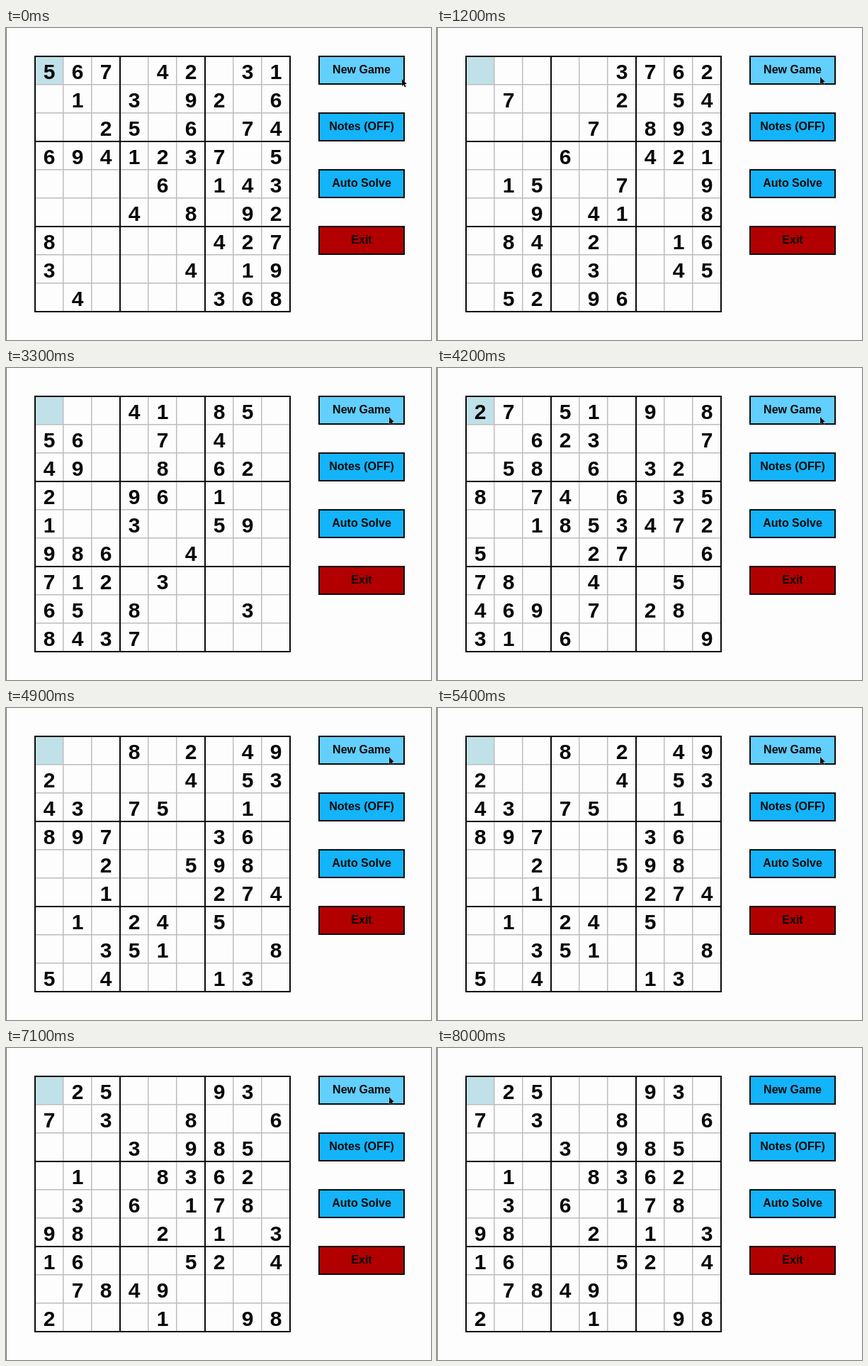
Recreate the animation shown at these times as an HTML page with a canvas. Size 600 by 440 pixels, loop 8200 ms.

```html
<!DOCTYPE html>
<html lang="en">
<head>
<meta charset="utf-8">
<title>Sudoku</title>
<style>
  html, body { margin: 0; width: 600px; height: 440px; overflow: hidden; }
  canvas { display: block; }
</style>
</head>
<body>
<canvas id="stage" width="600" height="440"></canvas>
<script>
const ctx = document.getElementById('stage').getContext('2d');
const LOOP = 8200, CELL = 40, LEFT = 40, TOP = 39;
const FONT = '"Liberation Sans", Arial, sans-serif';

// Nine rows per puzzle, a dot is an empty cell.
const puzzles = [
  '567.42.31 .1.3.92.6 ..25.6.74 6941237.5 ....6.143 ...4.8.92 8.....427 3....4.19 .4....368',
  '.....3762 .7...2.54 ....7.893 ...6..421 .15..7..9 ..9.41..8 .84.2..16 ..6.3..45 .52.96...',
  '.1...5973 ...81.562 ...796.14 4.....328 1.8934... 3..27.491 .4.1872.. 5..36..4. 731542.89',
  '27.51.9.8 ..623...7 .58.6.32. 8.74.6.35 ..1853472 5...27..6 78..4..5. 469.7.28. 31.6....9',
  '...8.2.49 2....4.53 43.75..1. 897...36. ..2..598. ..1...274 .1.24.5.. ..351...8 5.4...13.',
  '39.5....1 ....98.63 2.84..7.. 1.392.67. ....3.945 7.9..6..2 4.237.586 685.423.. ..76.52..',
  '.25...93. 7.3..8..6 ...3.985. .1..8362. .3.6.178. 98..2.1.3 16...52.4 .7849.... 2...1..98'
].map(rows => rows.replaceAll(' ', ''));

// Half a turn with complemented digits gives another valid puzzle.
const turned = p => [...p].reverse().map(c => c === '.' ? c : 10 - c).join('');

const schedule = [
  [0, puzzles[0]], [800, puzzles[1]], [1600, turned(puzzles[0])],
  [2400, puzzles[2]], [3100, turned(puzzles[1])], [4200, puzzles[3]],
  [4900, puzzles[4]], [5500, turned(puzzles[2])], [6100, puzzles[5]],
  [6700, puzzles[6]]
];

const LEAVE = 7700;
const ease = (t, from, to) => {
  const p = Math.min(1, Math.max(0, (t - from) / (to - from)));
  return p * p * (3 - 2 * p);
};

function rect(color, x, y, w, h) {
  ctx.fillStyle = color;
  ctx.fillRect(x, y, w, h);
}

function label(text, x, baseline, size) {
  ctx.font = `bold ${size}px ${FONT}`;
  ctx.textAlign = 'center';
  ctx.fillStyle = '#080808';
  ctx.fillText(text, x, baseline);
}

function drawBoard(puzzle) {
  rect('#c0e1e8', LEFT + 1, TOP + 1, CELL, CELL);
  const line = (i, color, width) => {
    rect(color, LEFT + i * CELL, TOP, width, 9 * CELL + 2);
    rect(color, LEFT, TOP + i * CELL, 9 * CELL + 2, width);
  };
  for (let i = 0; i < 10; i++) if (i % 3) line(i, '#bebcbe', 1.5);
  for (let i = 0; i < 10; i += 3) line(i, '#0a0a0a', 2);
  [...puzzle].forEach((digit, i) => {
    if (digit === '.') return;
    label(digit, 61 + i % 9 * CELL, 71.5 + Math.floor(i / 9) * CELL, 30);
  });
}

function drawButton(text, row, color) {
  const y = 39 + row * 80;
  rect('#0a0a0a', 441, y, 122, 41);
  rect(color, 443, y + 2, 118, 37);
  label(text, 502, y + 25, 16);
}

function drawCursor(x, y) {
  ctx.beginPath();
  [[0, 0], [0, 10], [2.3, 8], [4, 11.5], [5.6, 10.8], [4, 7.2], [7, 7]]
    .forEach(([dx, dy]) => ctx.lineTo(x + dx, y + dy));
  ctx.closePath();
  ctx.lineWidth = 1;
  ctx.strokeStyle = 'rgba(255, 255, 255, 0.5)';
  ctx.stroke();
  ctx.fillStyle = '#080808';
  ctx.fill();
}

function draw(t) {
  rect('#fefdfe', 0, 0, 600, 440);
  rect('#777', 0, 0, 1, 440);
  drawBoard(schedule.findLast(([start]) => t >= start)[1]);

  const hover = t < LEAVE;
  drawButton('New Game', 0, hover ? '#62cffc' : '#13b4f9');
  drawButton('Notes (OFF)', 1, '#13b4f9');
  drawButton('Auto Solve', 2, '#13b4f9');
  drawButton('Exit', 3, '#b20000');

  if (hover) {
    const settle = ease(t, 50, 800);
    drawCursor(559 - 18 * settle, 72 - 3 * settle - 26 * ease(t, 7350, LEAVE));
  }
}

function tick() {
  draw(performance.now() % LOOP);
  requestAnimationFrame(tick);
}
tick();
</script>
</body>
</html>
```
